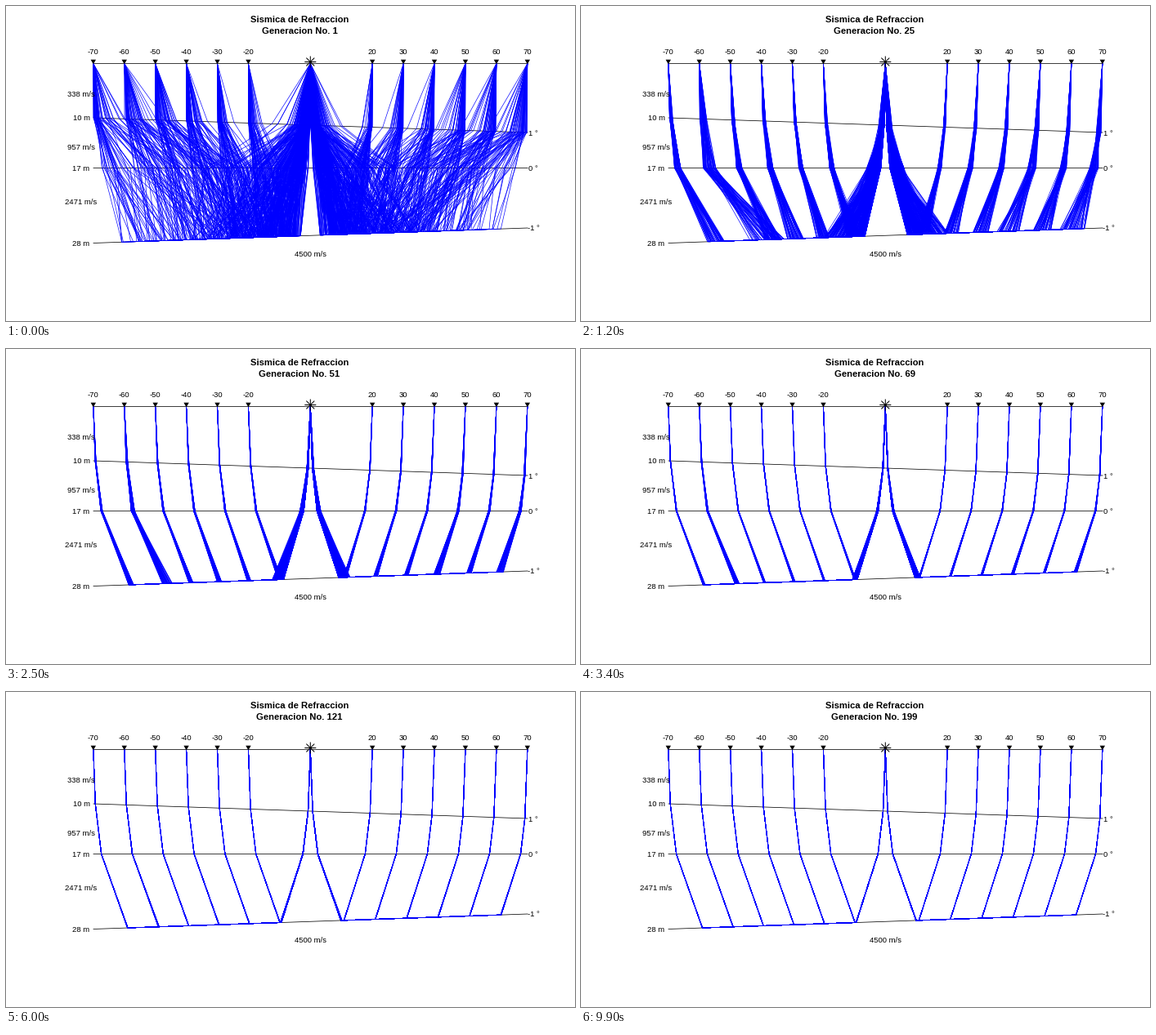
These frames come from a looping animation (696x386 px, 10000 ms). A matplotlib script:

```python
import numpy as np
import matplotlib as mpl
import matplotlib.pyplot as plt
from matplotlib.animation import FuncAnimation
from matplotlib.collections import LineCollection

mpl.rcParams["font.family"] = "Liberation Sans"

W, H, DPI = 696, 386, 100
PX = 72 / DPI
FRAMES, INTERVAL = 100, 100
LEFT, RIGHT, TOP = 107, 638, 70.5
SHOT = 372.3
RAYS = 55

# Spread of the ray ends at the deepest layer for each receiver,
# as a share of the current population spread
SPREAD = {
    -70: (0.15, 0.70), -60: (0.50, 1.60), -50: (0.05, 0.55),
    -40: (-0.20, 0.30), -30: (-0.25, 0.15), -20: (-0.25, 0.20),
    20: (-0.30, 0.05), 30: (-0.25, 0.20), 40: (-0.20, 0.28),
    50: (-0.20, 0.50), 60: (-0.20, 0.35), 70: (-0.27, 0.50),
}


def to_x(metres):
    return SHOT + metres * (RIGHT - LEFT) / 140


def layer(i, x):
    """Pixel depth of interface i (0 is the surface)."""
    y0, y1 = [(TOP, TOP), (137, 155), (198.5, 198.5), (290.5, 272)][i]
    return y0 + (y1 - y0) * (x - LEFT) / (RIGHT - LEFT)


def critical(x, slope):
    """Horizontal offsets of the critically refracted ray starting at x."""
    y = [layer(i, x) for i in range(4)]
    a = 0.0365 * (y[1] - y[0])
    b = a + 0.12 * (y[2] - y[1])
    return np.array([a, b, b + slope * (y[3] - y[2])])


def first_guess(rng, dist, near, far):
    c = dist * rng.uniform(near, far, RAYS)
    b = c * rng.uniform(0.2, 0.9, RAYS)
    a = b * 0.42 * rng.random(RAYS)
    return np.array([a, b, c])


def ordered(off):
    a, b, c = off
    c = np.maximum(c, 12)
    b = np.clip(b, 1.5, c)
    return np.array([np.clip(a, 0.3, b), b, c])


def population_spread(k):
    keys = [0, 6, 18, 34, 60, 80, 100]
    size = [120, 75, 21, 5, 1.1, 0.4, 0.3]
    return np.exp(np.interp(k, keys, np.log(size)))


def rays(k):
    rng = np.random.default_rng(400 + k)
    width = population_spread(k)
    wild = np.exp(-k / 2)
    paths = []
    for pos, (lo, hi) in SPREAD.items():
        side = np.sign(pos)
        x = to_x(pos)
        dist = abs(x - SHOT)

        u = rng.random((3, RAYS))
        span = hi - lo
        noise = width * np.array([span * (-0.05 + 0.2 * u[0]),
                                  span * (-0.12 + 0.37 * u[1]),
                                  lo + span * u[2]])
        up = critical(x, 0.345 if side < 0 else 0.325)[:, None] + noise
        guess = first_guess(rng, dist, 0.12, 0.7)
        up = ordered(wild * guess + (1 - wild) * up)

        n = -0.27 + 1.27 * rng.random((3, RAYS)) ** 2.3
        noise = width * n * np.array([[0.14], [0.35], [1.0]])
        down = critical(SHOT, 0.322 if side < 0 else 0.345)[:, None] + noise
        guess = first_guess(rng, dist, 0.1, 0.55)
        down = ordered(wild * guess + (1 - wild) * down)

        ends = np.ones((1, RAYS))
        xs = np.vstack([x * ends, x - side * up,
                        SHOT + side * down[::-1], SHOT * ends])
        ys = np.array([layer(i, row)
                       for i, row in zip([0, 1, 2, 3, 3, 2, 1, 0], xs)])
        paths.append(np.stack([xs.T, ys.T], axis=2))
    return np.concatenate(paths)


fig = plt.figure(figsize=(W / DPI, H / DPI), dpi=DPI, facecolor="white")
ax = fig.add_axes([0, 0, 1, 1])
ax.set_xlim(0, W)
ax.set_ylim(H, 0)
ax.axis("off")


def label(x, y, text, size=9.45, **kw):
    return ax.text(x, y + 3, text, fontsize=size * PX, ha="center",
                   va="baseline", zorder=5, **kw)


for i in range(4):
    ax.plot([LEFT, RIGHT], [layer(i, LEFT), layer(i, RIGHT)],
            color="black", lw=0.75 * PX, snap=False, zorder=1)

bundle = LineCollection([], colors="#0000ff", linewidths=0.65 * PX, zorder=2)
ax.add_collection(bundle, autolim=False)

for pos in SPREAD:
    x = to_x(pos)
    ax.fill([x - 3.2, x + 3.2, x], [65.7, 65.7, 71.3],
            color="black", lw=0, zorder=4)
    label(x, 56, str(pos))

for angle in np.arange(4) * np.pi / 4:
    dx, dy = 6.5 * np.cos(angle), 6.5 * np.sin(angle)
    ax.plot([SHOT - dx, SHOT + dx], [68.5 - dy, 68.5 + dy],
            color="black", lw=1 * PX, snap=False, zorder=4)

for y, text in [(108, "338 m/s"), (137, "10 m"), (173, "957 m/s"),
                (199, "17 m"), (240, "2471 m/s"), (291, "28 m")]:
    label(92, y, text)
for y, text in [(156, "1 °"), (199, "0 °"), (272, "-1 °")]:
    label(645, y, text)
label(SHOT + 0.5, 304, "4500 m/s")

label(359, 17, "Sismica de Refraccion", 11.2, weight="bold")
counter = label(359, 31, "", 11.2, weight="bold")


def update(k):
    bundle.set_segments(rays(k))
    counter.set_text(f"Generacion No. {2 * k + 1}")
    return bundle, counter


anim = FuncAnimation(fig, update, frames=FRAMES, interval=INTERVAL,
                     repeat=True, repeat_delay=0)
plt.show()
```
